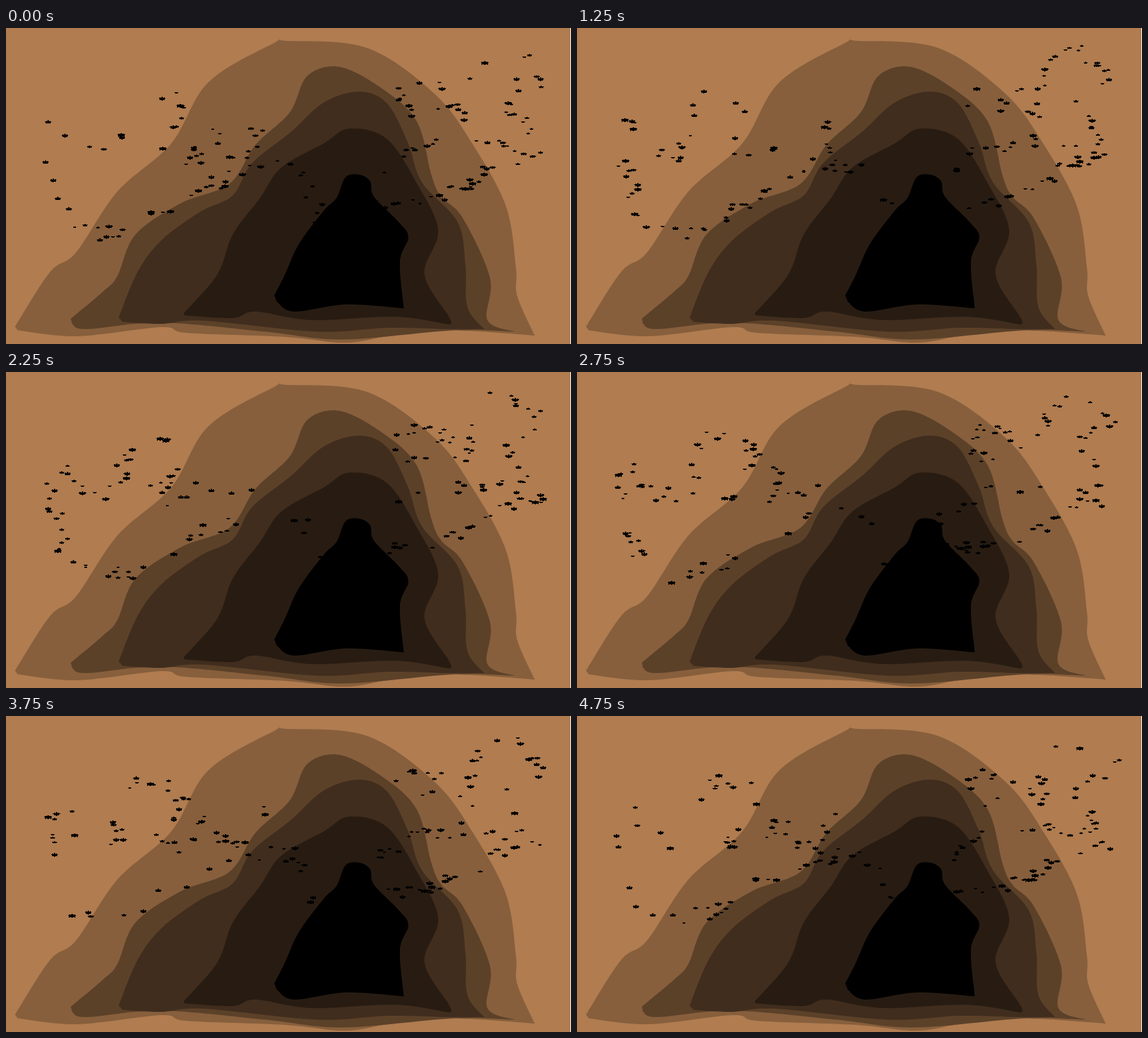
These frames come from a looping animation (872x487 px, 5 s). An HTML page:

```html
<!DOCTYPE html>
<html lang="en">
<head>
<meta charset="utf-8">
<title>Bat cave</title>
<style>
  html, body { margin: 0; width: 100%; height: 100%; overflow: hidden; background: #b07c50; }
  svg { display: block; width: 100%; height: 100%; }
</style>
</head>
<body>
<svg viewBox="0 0 872 487">
  <g id="cave"></g>
  <path id="bats" shape-rendering="crispEdges"/>
  <path d="M871 0h1v487h-1z" fill="#fff"/>
</svg>
<script>
const LOOP = 5000, STEP = 250;

// Each rock layer: the arch from left to right, then the floor back to the left.
const layers = [
  { color: '#875f3c',
    arch: '14,460 68,376 108,346 172,252 255,178 312,84 412,24 435,20 558,31 662,102 722,182 772,276 787,370 789,413 816,474',
    floor: '816,474 690,466 600,473 525,485 430,476 280,470 240,461 110,475 18,466' },
  { color: '#5c4129',
    arch: '100,448 150,406 172,382 200,318 270,270 345,240 385,180 438,130 465,74 515,60 580,93 634,144 657,228 672,260 705,293 747,385 743,450 785,468',
    floor: '785,468 690,466 520,480 400,468 240,454 125,464 102,456' },
  { color: '#402d1e',
    arch: '174,446 203,376 240,327 300,283 350,258 380,208 440,160 490,115 545,98 588,116 620,176 642,238 697,299 709,365 712,430 738,464',
    floor: '738,464 685,464 590,462 480,468 305,451 240,456 180,453' },
  { color: '#281c12',
    arch: '274,440 326,380 350,318 392,262 425,215 490,178 530,155 588,171 635,241 667,312 646,380 685,447 684,457',
    floor: '684,457 600,445 470,450 385,437 350,447 276,443' },
  { color: '#000',
    arch: '414,412 430,381 452,333 490,282 510,262 524,230 545,226 562,236 568,260 605,298 621,322 608,360 614,432',
    floor: '614,432 525,426 445,437 418,422' }
];

// Each flock streams out of the cave along its own route.
const flocks = [
  { count: 72, spread: 11,
    route: '480,290 462,238 430,213 375,222 282,256 215,297 150,316 100,295 80,225 64,185 85,145 108,180 163,192 182,140 210,100 274,124 232,192 292,198 310,155 335,192 376,190 392,138' },
  { count: 26, spread: 9,
    route: '572,270 640,268 720,238 762,209 823,197' },
  { count: 52, spread: 11,
    route: '566,230 612,192 680,178 742,174 790,186 804,158 780,130 790,92 828,80 769,38 728,65 712,131 660,92 618,88 616,130 665,115' }
];

const parse = text => text.split(' ').map(p => p.split(',').map(Number));

// Catmull-Rom spline through the points, as Bézier segments.
function spline(pts) {
  const at = i => pts[Math.max(0, Math.min(pts.length - 1, i))];
  return pts.slice(1).map((end, i) => {
    const from = at(i), before = at(i - 1), after = at(i + 2);
    const c1 = from.map((v, k) => v + (end[k] - before[k]) / 6);
    const c2 = end.map((v, k) => v - (after[k] - from[k]) / 6);
    return `C${c1} ${c2} ${end}`;
  }).join('');
}

function makePath(d, fill = 'none') {
  const path = document.createElementNS('http://www.w3.org/2000/svg', 'path');
  path.setAttribute('d', d);
  path.setAttribute('fill', fill);
  return path;
}

function makeRandom(seed) {
  return () => (seed = seed * 16807 % 2147483647) / 2147483647;
}

const cave = document.getElementById('cave');
for (const { color, arch, floor } of layers) {
  const top = parse(arch);
  cave.append(makePath('M' + top[0] + spline(top) + spline(parse(floor)) + 'Z', color));
}

const random = makeRandom(41);
const scatter = range => (random() * 2 - 1) * range;

const bats = flocks.flatMap(({ count, spread, route }) => {
  const pts = parse(route);
  const path = makePath('M' + pts[0] + spline(pts));
  const length = path.getTotalLength();
  return Array.from({ length: count }, () => ({
    path, length,
    phase: random(),
    dx: scatter(spread),
    dy: scatter(spread),
    size: 0.4 + 0.7 * random()
  }));
});

// Right half of a bat from head to tail, mirrored for the left.
const half = parse('0,-2.4 0.9,-3.2 1.3,-1.4 3,-2 6.2,-1 4.6,0.4 4.2,2.6 2.2,1.4 0,3.2');
const outline = [...half, ...half.slice(1, -1).reverse().map(([x, y]) => [-x, y])];

function drawBat({ path, length, phase, dx, dy, size }, t) {
  const p = path.getPointAtLength((phase + t) % 1 * length);
  const x = Math.round(p.x + dx), y = Math.round(p.y + dy);
  return 'M' + outline.map(([u, v]) => [x + u * size, y + v * size]).join('L') + 'Z';
}

const flight = document.getElementById('bats');
const start = performance.now();
let shown = -1;

function render() {
  const step = Math.floor((performance.now() - start) % LOOP / STEP);
  if (step !== shown) {
    shown = step;
    flight.setAttribute('d', bats.map(bat => drawBat(bat, step * STEP / LOOP)).join(''));
  }
  requestAnimationFrame(render);
}
render();
</script>
</body>
</html>
```
